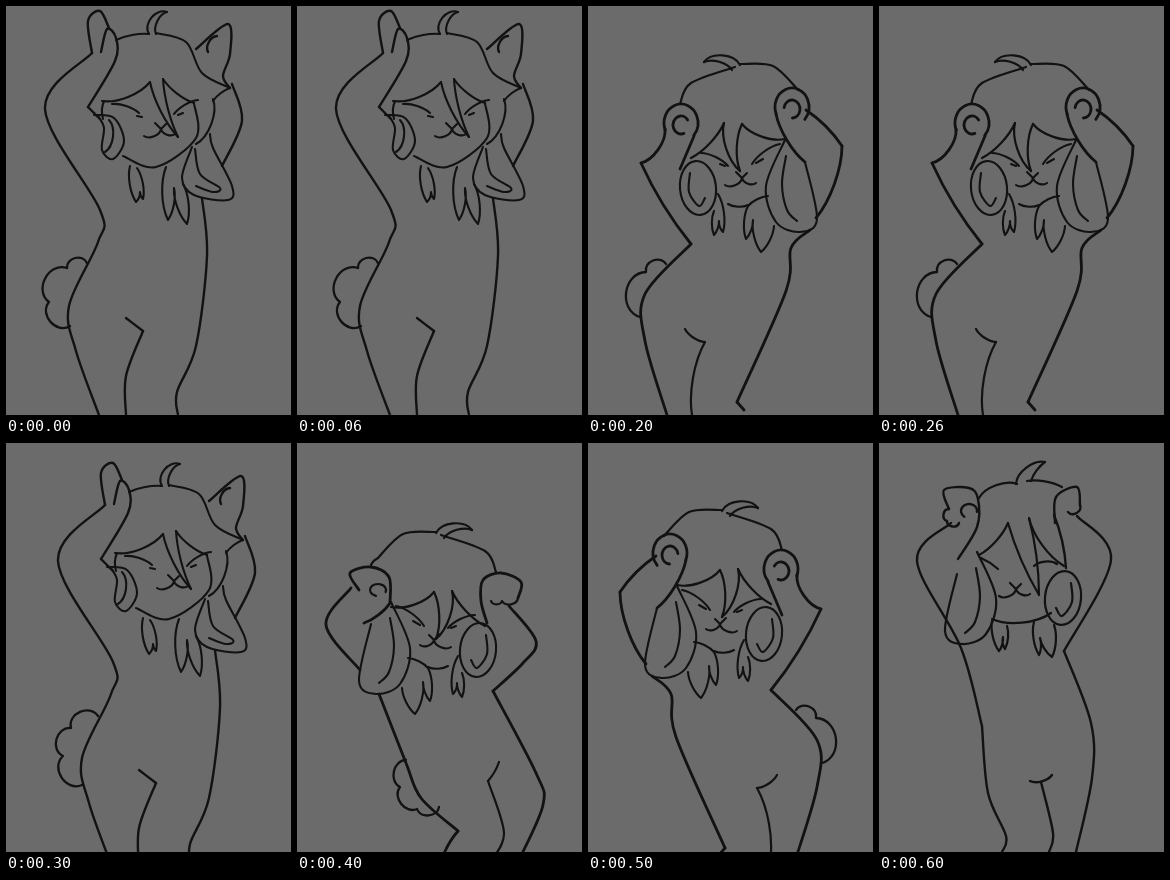
An HTML page with a canvas that plays this animation: 285x409 px, repeating every 0.7 s.

```html
<!DOCTYPE html>
<html>
<head>
<meta charset="utf-8">
<title>Dancing bunny</title>
<style>
html, body { margin: 0; width: 100%; height: 100%; overflow: hidden; background: #6b6b6b; }
canvas { display: block; }
</style>
</head>
<body>
<canvas id="stage" width="285" height="409"></canvas>
<script>
const c = document.getElementById('stage').getContext('2d');
c.lineCap = c.lineJoin = 'round';

const pen = w => { c.lineWidth = w; };

// Smooth stroke through x, y pairs
function curve(...v) {
  const last = v.length / 2 - 1;
  const at = i => { i = Math.max(0, Math.min(last, i)); return [v[2 * i], v[2 * i + 1]]; };
  c.beginPath();
  c.moveTo(v[0], v[1]);
  for (let i = 0; i < last; i++) {
    const [a, b, d, e] = [at(i - 1), at(i), at(i + 1), at(i + 2)];
    c.bezierCurveTo(b[0] + (d[0] - a[0]) / 6, b[1] + (d[1] - a[1]) / 6,
      d[0] - (e[0] - b[0]) / 6, d[1] - (e[1] - b[1]) / 6, d[0], d[1]);
  }
  c.stroke();
}

// Chain of arcs with sharp joints; positive k bulges to the left of travel
function bend(k, x, y, ...v) {
  const t = (1 - 1.5 * Math.abs(k)) / 3;
  c.beginPath();
  c.moveTo(x, y);
  while (v.length) {
    const [X, Y] = v.splice(0, 2), dx = X - x, dy = Y - y;
    c.bezierCurveTo(x + t * dx + k * dy, y + t * dy - k * dx,
      X - t * dx + k * dy, Y - t * dy - k * dx, X, Y);
    [x, y] = [X, Y];
  }
  c.stroke();
}

function oval(x, y, rx, ry, turn = 0, from = 0, to = 2 * Math.PI) {
  c.beginPath();
  c.ellipse(x, y, rx, ry, turn, from, to);
  c.stroke();
}

function shifted(x, y, draw, flip = 1) {
  c.save();
  c.translate(x, y);
  c.scale(flip, 1);
  draw();
  c.restore();
}
const mirrored = (x, y, draw) => shifted(x, y, draw, -1);

const tuft = (...v) => bend(-0.12, ...v);

function tail(k, ...v) {
  pen(2.3);
  bend(k, ...v);
}

function mouth() {
  bend(0, -6, -6, 0, 0, 5, -5);
  bend(-0.3, -17, 7, 0, 0, 14, 5);
}

function roundEar() {
  oval(0, 0, 18, 27, -0.1);
  curve(-8, -15, -9, 4, 1, 18, 7, 10);
}

function droopEar() {
  curve(0, 0, -19, 46, -9, 82, 15, 92, 32, 79, 20, 22);
  curve(1, 16, -3, 44, 2, 70, 12, 81);
}

function ringPaw(x, y, gap) {
  oval(x, y, 17, 19, 0, 2.75, 7);
  oval(x, y + 2, 8, 9, 0, gap + 0.9, gap + 5.4);
}

function hair() {
  pen(2.2);
  curve(92, 98, 103, 77, 147, 61);
  bend(0.3, 116, 56, 152, 59);
  bend(0.2, 116, 56, 144, 64);
  curve(152, 58, 185, 60, 210, 84);
  bend(-0.1, 103, 152, 136, 117);
  bend(-0.16, 136, 117, 152, 165);
  bend(-0.12, 154, 118, 152, 165);
  bend(-0.16, 154, 118, 197, 133);
}

function face() {
  pen(2.1);
  shifted(154, 172, () => {
    mouth();
    bend(0.12, -41, -25, -14, -12);
    bend(0, -22, -14, -17, -12);
    bend(0.12, 10, -14, 38, -34);
    bend(0, 14, -15, 21, -19);
    bend(-0.15, -14, 26, 6, 27);
  });
  shifted(110, 182, roundEar);
  shifted(197, 134, droopEar);
  tuft(126, 205, 126, 229, 131, 215, 135, 226, 130, 188);
  tuft(180, 190, 160, 200, 158, 233, 165, 214, 173, 246, 186, 220);
}

function stretch() {
  pen(2.4);
  // paws and arms
  curve(86, 47, 82, 15, 94, 5, 103, 22);
  curve(95, 46, 101, 23, 110, 32, 109, 55, 82, 101);
  bend(0, 82, 101, 94, 113);
  curve(190, 43, 222, 18, 224, 48, 217, 70, 224, 82);
  bend(0.3, 202, 46, 211, 30);
  curve(226, 78, 236, 115, 216, 160);
  // body
  curve(86, 47, 39, 103, 94, 204, 92, 236, 63, 300, 70, 345, 93, 409);
  curve(196, 192, 201, 250, 190, 340, 171, 386, 172, 409);
  bend(0, 120, 312, 137, 325);
  curve(137, 325, 120, 370, 120, 409);
  // hair
  pen(2.1);
  bend(0.08, 110, 34, 143, 28);
  bend(0.4, 143, 28, 161, 6);
  bend(-0.25, 161, 6, 150, 28);
  curve(150, 27, 180, 36, 196, 67, 224, 82);
  bend(-0.1, 224, 82, 207, 95);
  bend(0.2, 207, 93, 190, 138);
  curve(188, 97, 190, 132, 150, 161, 117, 150);
  bend(-0.15, 96, 95, 144, 76);
  bend(-0.08, 144, 76, 172, 131);
  bend(0.06, 172, 131, 157, 73);
  bend(-0.1, 157, 73, 188, 97);
  bend(-0.1, 98, 95, 97, 113);
  // ears
  curve(88, 109, 108, 112, 118, 135, 107, 153, 96, 144, 98, 122, 92, 110);
  bend(0.25, 103, 114, 99, 146);
  curve(186, 141, 176, 172, 188, 189, 222, 194, 226, 180, 207, 142, 204, 128);
  curve(189, 143, 194, 168, 214, 182, 207, 186, 190, 180);
  // face and chest
  bend(0.12, 106, 98, 133, 107);
  bend(0, 131, 110, 136, 111);
  bend(0.12, 168, 108, 192, 94);
  bend(0, 172, 109, 177, 107);
  shifted(155, 123, mouth);
  tuft(124, 160, 130, 196, 134, 186, 137, 193, 131, 162);
  tuft(160, 161, 162, 214, 168, 182, 181, 218, 177, 178);
}

function lean(sag) {
  pen(2.8);
  curve(75, 145, 72, 129, 92, 120, 110, 127, 112, 148, 106, 170);
  curve(84, 153, 57, 188, 70, 210, 100, 238);
  curve(100, 238, 57, 320, 50, 352, 75, 409);
  curve(203, 150, 204, 124, 222, 114, 243, 120, 234, 137);
  bend(-0.1, 203, 150, 229, 170);
  curve(242, 135, 267, 172, 233, 217);
  curve(214, 241, 187, 310, 172, 345, 135, 378);
  bend(0.06, 135, 378, 151, 406);
  pen(2.2);
  bend(-0.4, 75, 145, 91, 148, 102, 148);
  oval(215, 137, 8, 6, 0, 2.8, 7.6);
  bend(-0.06, 94, 309, 105, 328);
  curve(105, 328, 89, 380, 102, 408);
  shifted(5, 15 + sag, hair);
  bend(0.1, 215, 99 + sag, 222, 112);
  shifted(5, 15, face);
}

function sway() {
  pen(2.8);
  ringPaw(93, 117, 0.3);
  ringPaw(204, 101, 2.4);
  bend(0, 106, 130, 92, 163);
  bend(-0.1, 188, 108, 217, 156);
  bend(0.2, 77, 123, 53, 157);
  bend(-0.04, 53, 157, 103, 238);
  bend(0.06, 218, 104, 254, 140);
  bend(0.1, 254, 140, 228, 212);
  curve(103, 238, 57, 288, 57, 335, 79, 409);
  curve(222, 224, 203, 242, 198, 285, 149, 396);
  bend(0, 149, 396, 156, 404);
  pen(2.2);
  bend(-0.15, 97, 323, 117, 336);
  bend(-0.1, 117, 336, 104, 409);
  hair();
  face();
}

function rise() {
  pen(2.4);
  // paws and arms
  curve(70, 66, 65, 47, 90, 45, 99, 56, 98, 84, 79, 116);
  bend(-0.5, 70, 66, 68, 78, 80, 80);
  oval(90, 68, 8, 7, 0, 2.2, 6.4);
  curve(176, 80, 177, 54, 198, 44, 201, 62);
  bend(0.5, 201, 62, 189, 69);
  bend(0.05, 175, 72, 187, 125);
  curve(72, 80, 38, 118, 82, 205, 103, 283);
  curve(198, 73, 232, 117, 185, 208);
  // body
  curve(103, 283, 109, 350, 127, 393, 123, 409);
  curve(185, 208, 212, 280, 213, 335, 197, 409);
  bend(-0.2, 151, 338, 173, 332);
  curve(162, 339, 174, 390, 170, 409);
  // ears
  pen(2.2);
  mirrored(98, 109, droopEar);
  mirrored(184, 155, roundEar);
  // hair
  bend(0.2, 100, 55, 138, 41);
  bend(0.25, 137, 41, 166, 19);
  bend(-0.1, 166, 19, 152, 38);
  bend(0.1, 148, 38, 183, 44);
  bend(-0.1, 100, 112, 129, 80);
  bend(-0.04, 129, 80, 160, 152, 150, 75);
  bend(-0.12, 150, 75, 185, 123);
  // face and chest
  bend(0.05, 102, 115, 119, 126);
  bend(0.2, 155, 123, 178, 121);
  shifted(137, 146, mouth);
  bend(-0.15, 113, 176, 172, 170);
  tuft(113, 178, 120, 208, 124, 194, 126, 206, 128, 183);
  tuft(155, 179, 160, 212, 161, 195, 173, 214, 175, 182);
}

const leanTail = () => tail(0.5, 190, 298, 207, 318, 187, 351, 164, 353);
const swayTail = () => tail(-0.5, 78, 258, 58, 266, 52, 311);

const poses = [
  () => { stretch(); tail(-0.5, 81, 257, 61, 262, 43, 296, 64, 320); },
  () => { lean(0); leanTail(); },
  () => { sway(); swayTail(); },
  () => { shifted(13, 15, stretch); tail(-0.5, 92, 273, 65, 285, 57, 313, 76, 342); },
  () => { mirrored(296, 10, () => lean(6)); tail(-0.45, 109, 317, 103, 344, 120, 366, 142, 364); },
  () => mirrored(286, 9, () => { sway(); swayTail(); }),
  rise
];

function tick() {
  c.fillStyle = '#6b6b6b';
  c.fillRect(0, 0, 285, 409);
  c.strokeStyle = '#121212';
  poses[Math.floor(performance.now() / 100) % poses.length]();
  requestAnimationFrame(tick);
}
tick();
</script>
</body>
</html>
```
